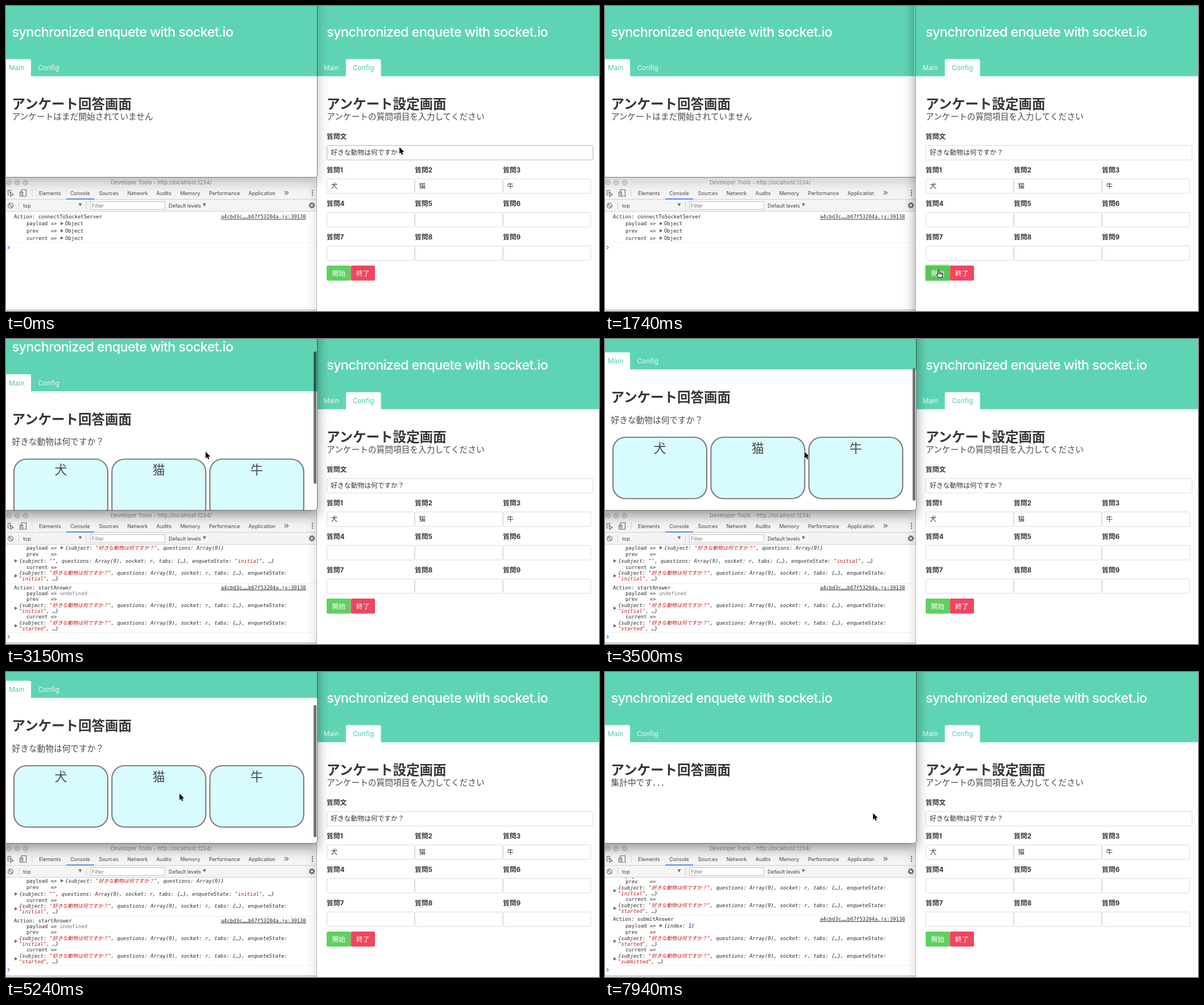
An HTML page that plays this animation: 1043x537 px, repeating every 8000 ms.

```html
<!DOCTYPE html>
<html lang="ja">
<head>
<meta charset="utf-8">
<title>synchronized enquete</title>
<style>
  html, body { margin: 0; width: 100%; height: 100%; overflow: hidden; background: #fff; }
  svg { display: block; width: 100vw; height: 100vh; }
  text { font-family: Inter, "Noto Sans CJK JP", "Noto Sans CJK", sans-serif; white-space: pre; fill: #4a4a4a; }
  .title, .sub, .field, .option { font-family: "Noto Sans CJK JP", "Noto Sans CJK", sans-serif; }
  .brand { font-size: 23.5px; font-weight: 500; letter-spacing: -.0285em; fill: #fff; }
  .tab { font-size: 11.8px; fill: #fff; fill-opacity: .85; }
  .tab.on { fill: #4ccbab; fill-opacity: 1; }
  .title { font-size: 23.5px; font-weight: 700; fill: #363636; }
  .sub { font-size: 14.7px; }
  .label { font-size: 11.76px; font-weight: 700; fill: #363636; }
  .field { font-size: 11.76px; fill: #363636; }
  .button { font-size: 11.76px; fill: #fff; text-anchor: middle; }
  .option { font-size: 22px; text-anchor: middle; }
  .ui { font-size: 8.95px; fill: #444; }
  .log { font: 8.9px "DejaVu Sans Mono", "Noto Sans CJK JP", "Noto Sans CJK", monospace; fill: #2a2a2a; }
  .obj { font-style: italic; }
  .str { fill: #c41a16; }
  .num { fill: #1c00cf; }
  .undef { fill: #7a7a7a; }
  .link { text-decoration: underline; }
</style>
</head>
<body>
<svg id="stage" viewBox="0 0 1043 537" xmlns="http://www.w3.org/2000/svg"></svg>
<script>
const LOOP = 8000, TICK = 87.3;
const TEAL = '#5fd4b4';
const SUBJECT = '好きな動物は何ですか？';
const ANIMALS = ['犬', '猫', '牛'];

const text = (cls, x, y, s) => `<text class="${cls}" x="${x}" y="${y}">${s}</text>`;
const rect = (x, y, w, h, fill, extra = '') =>
  `<rect x="${x}" y="${y}" width="${w}" height="${h}" fill="${fill}" ${extra}/>`;
const path = (d, extra) => `<path d="${d}" ${extra}/>`;
const group = (id, content, extra = '') => `<g id="${id}" ${extra}>${content}</g>`;

// Page header shared by both browser windows
function header(x, width, active) {
  const [tabX, tabW] = active === 'Main' ? [x - 17.5, 51] : [x + 33.8, 61.7];
  const cls = name => 'tab' + (name === active ? ' on' : '');
  return rect(x - 20, -90, width, 213.6, TEAL) +
    path(`M${tabX} 124v-27.4q0 -3 3 -3h${tabW - 6}q3 0 3 3v27.4z`, 'fill="#fff"') +
    text('brand', x, 53.7, 'synchronized enquete with socket.io') +
    text(cls('Main'), x - 5.4, 113.2, 'Main') +
    text(cls('Config'), x + 46, 113.2, 'Config');
}

const fields = [{ x: 564, y: 245, w: 469, label: '質問文', value: SUBJECT }];
for (let i = 0; i < 9; i++) {
  fields.push({
    x: 564 + i % 3 * 155, y: 304 + Math.floor(i / 3) * 59, w: 155,
    label: '質問' + (i + 1), value: ANIMALS[i] || ''
  });
}

function configWindow() {
  const inputs = fields.map(f =>
    text('label', f.x, f.y - 10.6, f.label) +
    rect(f.x + .5, f.y + .5, f.w - 1, 25.5, '#fff', 'class="input" rx="2.2" stroke="#dbdbdb"') +
    text('field', f.x + 7.3, f.y + 17.4, f.value)).join('');
  return rect(546, -20, 520, 600, '#fff') + header(564, 600, 'Config') +
    text('title', 564, 181, 'アンケート設定画面') +
    text('sub', 564, 200, 'アンケートの質問項目を入力してください') + inputs +
    rect(562.8, 455.8, 44.6, 28.6, 'none', 'id="ring" rx="3.2" stroke="#60d060" stroke-opacity=".4" stroke-width="2.2"') +
    rect(564, 457, 42.5, 26.5, '#60d060', 'id="start" rx="2.2"') +
    rect(606.5, 457, 42.5, 26.5, '#f0465f', 'rx="2.2"') +
    text('button', 585.3, 474.6, '開始') + text('button', 627.8, 474.6, '終了') +
    path('M546.5 0V537', 'stroke="#000" stroke-opacity=".3"');
}

function answerWindow() {
  const cards = ANIMALS.map((name, i) => {
    const x = 14 + i * 172.3;
    return rect(x, 243, 165, 108, '#d8fbfe', 'rx="22" stroke="#7f7f7f" stroke-width="2.2"') +
      text('option', x + 82.5, 269.6, name);
  }).join('');
  const page = header(10.5, 600, 'Main') +
    text('title', 10.5, 181, 'アンケート回答画面') +
    group('waiting', text('sub', 10.5, 200, 'アンケートはまだ開始されていません')) +
    group('question', text('sub', 10.5, 217.6, SUBJECT) + cards) +
    group('counting', text('sub', 10.5, 200, '集計中です．．．'));
  return rect(-20, -20, 568, 322, '#fff', 'rx="5"') +
    `<g clip-path="url(#answerClip)">${group('page', page)}` +
    rect(541, 0, 5, 233, '#000', 'id="thumb" rx="2.5" fill-opacity=".55"') + '</g>' +
    rect(-20, -20, 567.5, 321.6, 'none', 'rx="5" stroke="#000" stroke-opacity=".55"');
}

const arrowhead = (x, y) => path(`M${x} ${y - 3}l5.4 3l-5.4 3z`, 'fill="#6e6e6e"');
const str = s => `<tspan class="str">"${s}"</tspan>`;

// One logged action: payload, previous state, current state
function logBlock(y, action, payload, prev, current) {
  let out = '';
  const line = (x, s, cls = '') => { out += text('log ' + cls, x, y + 3.1, s); };
  const state = ([subject, value]) => {
    const head = `{subject: ${str(subject)}, questions: Array(9), socket: r, tabs: {…}, enqueteState:`;
    const tail = `${str(value)}, …}`;
    if (subject) {
      out += arrowhead(15, y + 5.5);
      line(23, head, 'obj');
      y += 10.3;
      line(23, tail, 'obj');
    } else {
      out += arrowhead(15, y);
      line(23, head + ' ' + tail, 'obj');
    }
  };
  const isObject = payload !== 'undefined';
  line(14, 'Action: ' + action);
  line(378, 'a4cbd3c……b67f53204a.js:39138', 'link');
  y += isObject ? 12 : 10.5;
  line(36, 'payload =>');
  if (isObject) out += arrowhead(96, y - .5);
  line(isObject ? 104 : 95, payload, isObject ? 'obj' : 'undef');
  y += isObject ? 11 : 10;
  line(36, 'prev    =>');
  y += prev[0] ? 10.4 : 11.8;
  state(prev);
  y += 10.6;
  line(36, 'current =>');
  y += 10.2;
  state(current);
  return out;
}

const prompt = y => path(`M3 ${y - 2.6}l3 2.8l-3 2.8`, 'fill="none" stroke="#4285f4" stroke-width="1.3"');
const divider = y => rect(0, y, 546, 1, '#f0f0f0');

function connectLog() {
  return text('log', 14, 374.4, 'Action: connectToSocketServer') +
    text('log link', 378, 374.4, 'a4cbd3c……b67f53204a.js:39138') +
    ['payload =>', 'prev    =>', 'current =>'].map((s, i) => {
      const y = 383.3 + i * 12.7;
      return text('log', 36, y + 3.1, s) + arrowhead(96, y - .3) + text('log', 104, y + 3.1, 'Object');
    }).join('') + divider(416) + prompt(425);
}

function answerLog(y) {
  return logBlock(y, 'startAnswer', 'undefined', [SUBJECT, 'initial'], [SUBJECT, 'started']);
}

function devtools() {
  const tabs = [[58, 'Elements'], [113, 'Console'], [163.5, 'Sources'], [213.5, 'Network'], [264.5, 'Audits'],
    [306.5, 'Memory'], [357, 'Performance'], [426.5, 'Application']];
  const lights = [5, 19.5, 34.5].map(x =>
    `<circle cx="${x}" cy="311" r="4.3" fill="#dcdcdc" stroke="#bdbdbd"/>`).join('');
  const icon = 'fill="none" stroke="#6e6e6e" stroke-width="1.2"';
  const down = (x, y) => path(`M${x} ${y}h6l-3 5.2z`, 'fill="#6e6e6e"');
  const payload = `{subject: ${str(SUBJECT)}, questions: Array(9)}`;
  return rect(0, 300, 546, 236, '#fff') + rect(0, 300, 546, 61, '#f4f4f4') + lights +
    `<text x="273" y="314.3" text-anchor="middle" style="font-size:9.5px;fill:#8c8c8c">Developer Tools - http://localhost:1234/</text>` +
    path('M10 324.5H3.5V333H6M7 327l6 5.5l-3 .3l-1.6 2.7z', icon) +
    path('M27 333.5V323.5H35.5V335H30M24.5 327.5h5v7.5h-5z', icon) +
    tabs.map(([x, s]) => text('ui', x, 332.5, s)).join('') +
    path('M490 326l3 3l-3 3M493.5 326l3 3l-3 3', icon) +
    [325, 329, 333].map(y => `<circle cx="539" cy="${y}" r="1.2" fill="#6e6e6e"/>`).join('') +
    rect(0, 340, 546, 1, '#d0d0d0') + rect(106, 338.8, 49, 1.8, '#4285f4') +
    `<circle cx="8" cy="351.5" r="4.4" ${icon}/>` + path('M5 348.5l6 6', icon) +
    rect(22, 345, 1, 13, '#ccc') + rect(45.5, 323, 1, 13, '#d4d4d4') + rect(141, 345, 1, 13, '#ccc') +
    text('ui', 30, 354.6, 'top') + down(127.5, 347.5) +
    rect(148.5, 344.5, 130.5, 13.5, '#fff', 'stroke="#c4c4c4"') +
    `<text class="ui" x="151" y="354.6" style="fill:#777">Filter</text>` +
    text('ui', 286, 354.6, 'Default levels') + down(346, 347.5) +
    `<circle cx="538" cy="351" r="3.2" fill="none" stroke="#6e6e6e" stroke-width="2.4"/>` +
    `<circle cx="538" cy="351" r="4.8" fill="none" stroke="#6e6e6e" stroke-width="1.5" stroke-dasharray="1.9 1.87"/>` +
    rect(0, 361, 546, 1, '#d0d0d0') +
    '<g clip-path="url(#consoleClip)">' +
    group('connectLog', connectLog()) +
    group('startLog', logBlock(356, 'startEnquete', payload, ['', 'initial'], [SUBJECT, 'initial']) +
      divider(430) + answerLog(437.5) + divider(516) + prompt(524)) +
    group('submitLog', answerLog(348.5) + divider(427.5) +
      logBlock(435, 'submitAnswer', '{index: <tspan class="num">1</tspan>}', [SUBJECT, 'started'], [SUBJECT, 'submitted']) +
      divider(516) + prompt(524)) +
    rect(544, 447, 2.5, 85, '#444', 'id="logThumb"') + '</g>' +
    rect(0, 534.6, 546, 1.2, '#a8a8a8');
}

const shadow = (id, x, y, w, h) =>
  rect(x, y, w, h, '#000', `id="${id}" filter="url(#blur)"`);

const stage = document.getElementById('stage');
stage.innerHTML = `<defs>
    <filter id="blur" x="-20%" y="-20%" width="140%" height="140%"><feGaussianBlur stdDeviation="10.5"/></filter>
    <clipPath id="answerClip"><rect x="-20" y="-20" width="568" height="322" rx="5"/></clipPath>
    <clipPath id="consoleClip"><rect y="362" width="546" height="173"/></clipPath>
  </defs>` +
  devtools() +
  group('windows',
    group('config', shadow('configShadow', 546, -40, 560, 640) + configWindow()) +
    group('answer', shadow('answerShadow', -40, -40, 588, 350) + answerWindow())) +
  group('cursor',
    group('arrow', path('M0 0V11.6L2.7 9.2L4.5 13.3L6.4 12.4L4.7 8.4H8.3Z', 'stroke="#fff" stroke-width="1.2" paint-order="stroke"')) +
    group('hand', path('M-1.4 7V.8q1.2 -1.4 2.4 0V5q1.1 -1 2.1 .1q1.1 -.7 2 .4q1.2 -.4 1.6 .8V9.4L5.4 13H-.4L-3.8 8.4q.2 -1.8 2.4 -.2zM1 5v2.5M3.1 5.2v2.3M5.1 5.7v2',
      'fill="#fff" stroke="#000" stroke-width="1"')));

const el = id => document.getElementById(id);
const inputs = [...document.querySelectorAll('.input')];
const show = (id, on) => el(id).setAttribute('display', on ? 'inline' : 'none');

// Keys are [tick, ...values]
function track(keys, tick) {
  const next = keys.findIndex(k => k[0] > tick);
  if (next < 0) return keys[keys.length - 1].slice(1);
  const a = keys[next - 1], b = keys[next], p = (tick - a[0]) / (b[0] - a[0]);
  return a.slice(1).map((v, i) => v + (b[i + 1] - v) * p);
}

const cursorKeys = [
  [0, 692, 248.5], [1, 693, 258], [2, 693, 258], [7, 721, 377], [8, 721, 377], [9, 723, 388], [10, 723, 388],
  [12, 671, 461], [13, 671, 461], [17, 587, 465], [22, 587, 465], [28, 351, 198.5], [49, 351, 198.5],
  [51, 341, 193], [53, 341, 193], [61, 300, 217], [71, 300, 217], [75, 290, 230], [79, 336, 244],
  [81, 336, 244], [84, 601, 397], [87, 526, 293], [88, 526, 293], [91, 471.5, 248.5]
];
const scrollKeys = [
  [0, 0], [33, 0], [34, 1], [35, 1], [36, 31.5], [37, 50], [38, 60], [39, 66], [40, 70],
  [42, 70], [43, 75], [44, 75], [45, 78]
];
const answerShade = [[0, .24], [2, .24], [3, .15], [28, .15], [29, .17], [30, .22], [31, .4]];
const configShade = [[0, .15], [2, .15], [3, .25], [5, .42], [28, .42], [31, .15]];

let frontId = '';
function bringToFront(id) {
  if (id !== frontId) el('windows').append(el(frontId = id));
}

function render(ms) {
  const tick = Math.floor(ms / TICK + .25);
  const started = tick >= 21, submitted = tick >= 66;

  bringToFront(tick >= 3 && tick < 29 ? 'config' : 'answer');
  el('answerShadow').setAttribute('opacity', track(answerShade, tick)[0]);
  el('configShadow').setAttribute('opacity', track(configShade, tick)[0]);

  show('waiting', !started);
  show('question', started && !submitted);
  show('counting', submitted);
  show('connectLog', !started);
  show('startLog', started && !submitted);
  show('submitLog', submitted);

  const scroll = submitted ? 0 : track(scrollKeys, tick)[0];
  el('page').setAttribute('transform', `translate(0 ${-scroll})`);
  show('thumb', scroll > 1);
  el('thumb').setAttribute('y', scroll * .774 - 2.4);
  show('logThumb', submitted);
  el('logThumb').setAttribute('opacity', track([[0, 1], [71, 1], [75, 0]], tick)[0]);

  const [x, y] = track(cursorKeys, tick);
  const inside = (left, top, w, h) => x >= left && x < left + w && y >= top && y < top + h;
  const overStart = inside(564, 457, 42.5, 26.5);
  const overButton = inside(564, 457, 85, 26.5);
  inputs.forEach((input, i) => {
    const f = fields[i];
    input.setAttribute('stroke', inside(f.x, f.y, f.w, 26) ? '#b5b5b5' : '#dbdbdb');
  });
  el('start').setAttribute('fill', overStart ? '#59c558' : '#60d060');
  show('ring', tick >= 18 && tick < 31);
  el('cursor').setAttribute('transform', `translate(${x} ${y})`);
  show('hand', overButton);
  show('arrow', !overButton);
}

const begin = performance.now();
function loop() {
  render((performance.now() - begin) % LOOP);
  requestAnimationFrame(loop);
}
loop();
</script>
</body>
</html>
```
